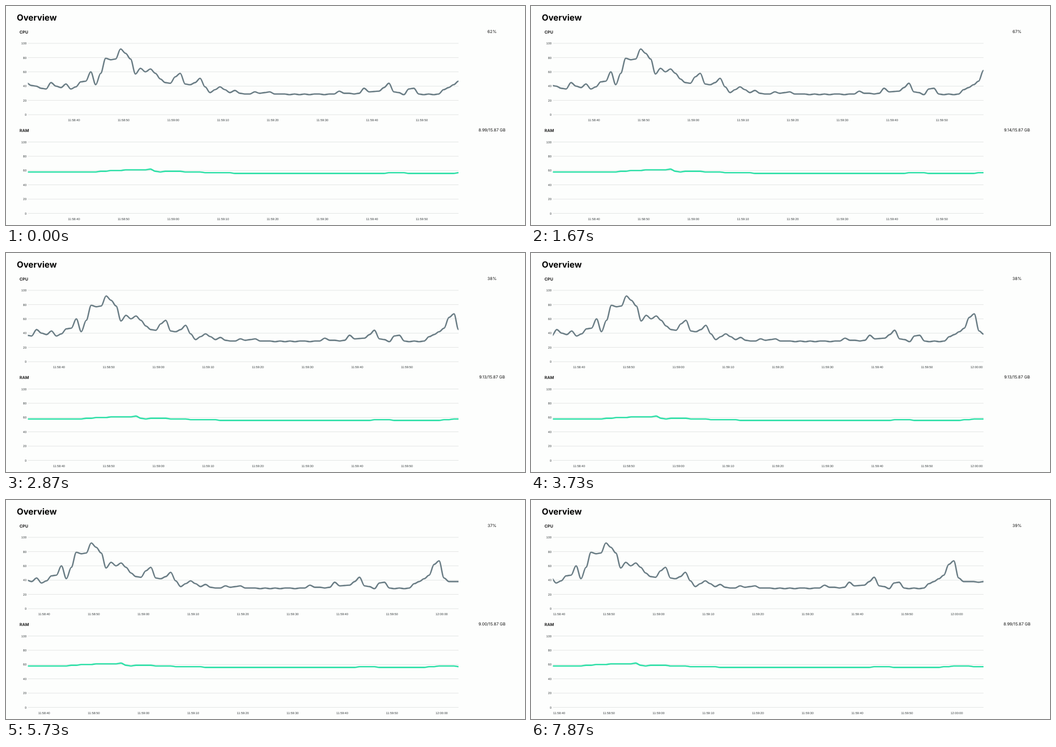
Animation, 960 px wide and 405 px high, one loop 8000 ms. Source, as an HTML page:

```html
<!DOCTYPE html>
<html lang="en">
<head>
<meta charset="utf-8">
<title>Overview</title>
<style>
  html, body { margin: 0; width: 100%; height: 100%; overflow: hidden; background: #fdfefd; }
  svg { display: block; width: 100vw; height: 100vh; text-rendering: geometricPrecision; }
  text { font-family: Inter, sans-serif; fill: #111; }
  .heading { font-size: 15.8px; font-weight: 700; fill: #000; }
  .title { font-size: 7.5px; font-weight: 700; fill: #222; }
  .value { font-size: 7.6px; text-anchor: middle; }
  .axis { font: 5.8px "Liberation Sans", Arial, sans-serif; fill: #373d3f; }
  .level { text-anchor: end; }
  .time { text-anchor: middle; }
  .grid { stroke: #e3e5e4; stroke-width: 1; }
  .line { fill: none; stroke-width: 2.6; }
</style>
</head>
<body>
<svg viewBox="0 0 960 405">
  <clipPath id="plot"><rect x="40.5" y="55" width="796.7" height="335"/></clipPath>
  <text class="heading" x="20" y="27">Overview</text>
</svg>
<script>
const LOOP = 8000, LEFT = 41, RIGHT = 837, STEP = 9.192, UNIT = 1.32;
const EASE_TIME = 400, FIRST_LAST = 87;
const updates = [580, 1700, 2690, 3570, 4552, 5550, 6622, 7600];

const cpu = [
  45, 41, 40, 37, 36, 45, 40, 38, 43, 36, 39, 46, 47, 60, 42, 58, 79, 77, 78, 92,
  86, 78, 57, 65, 60, 64, 58, 50, 45, 44, 53, 58, 43, 42, 45, 51, 39, 31, 35, 39,
  35, 31, 34, 30, 29, 29, 32, 30, 31, 32, 29, 29, 29, 28, 29, 28, 29, 28, 29, 29,
  28, 29, 29, 33, 30, 30, 29, 30, 37, 32, 32.5, 33, 38, 44, 32, 31, 28, 36, 37, 29,
  28, 29, 28, 29, 35, 38, 42, 47, 62, 67, 43, 38, 38, 38, 37, 38, 39
];
// RAM holds its level for long stretches: value x count
const ram = "58x15 59x2 60x3 61x5 62x1 59x1 58x1 59x4 58x4 57x6 56x31 57x4 56x10 57x2 58x4 57x3"
  .split(" ").flatMap(run => {
    const [value, count] = run.split("x").map(Number);
    return Array(count).fill(value);
  });
const ramUsed = ["8.99", "9.14", "9.13", "9.13", "9.13", "9.00", "9.00", "9.00", "8.99"];

const svg = document.querySelector("svg");

function add(tag, attrs, content = "") {
  const node = document.createElementNS("http://www.w3.org/2000/svg", tag);
  for (const key in attrs) node.setAttribute(key, attrs[key]);
  node.textContent = content;
  return svg.appendChild(node);
}

function makeChart(name, data, base, color) {
  add("text", { class: "title", x: 25, y: base - 150.3 }, name);
  for (let level = 0; level <= 100; level += 20) {
    const y = base - level * UNIT;
    add("line", { class: "grid", x1: LEFT, x2: RIGHT, y1: y, y2: y });
    add("text", { class: "axis level", x: 38, y: y + 2.1 }, level);
  }
  const times = Array.from({ length: 9 }, (_, i) => {
    const clock = i < 8 ? `${i < 2 ? "11:58" : "11:59"}:${(40 + i * 10) % 60 || "00"}` : "12:00:00";
    return add("text", { class: "axis time", y: base + 12 }, clock);
  });
  return {
    data, base, times,
    line: add("path", { class: "line", stroke: color, "clip-path": "url(#plot)" }),
    value: add("text", { class: "value", x: 899, y: base - 151.3 })
  };
}

const cpuChart = makeChart("CPU", cpu, 201, "#6a7d85");
const ramChart = makeChart("RAM", ram, 383.5, "#2fe0a8");

// Every point has a level tangent
function linePath(data, base, last, progress) {
  const y = v => base - v * UNIT;
  let px = RIGHT - (last - 1 + progress) * STEP, py = y(data[0]);
  let d = `M${px} ${py}`;
  for (let i = 1; i <= last; i++) {
    const newest = i === last;
    const x = newest ? RIGHT : RIGHT - (last - i - 1 + progress) * STEP;
    const value = newest ? data[i - 1] + (data[i] - data[i - 1]) * progress : data[i];
    const bend = (x - px) * 0.35;
    d += `C${px + bend} ${py} ${x - bend} ${y(value)} ${x} ${y(value)}`;
    px = x;
    py = y(value);
  }
  return d;
}

function drawChart({ data, base, times, line, value }, tick, progress, label) {
  line.setAttribute("d", linePath(data, base, FIRST_LAST + tick, progress));
  value.textContent = label;
  times.forEach((node, i) => {
    const x = 125.6 + i * 10 * STEP - tick * STEP;
    node.setAttribute("x", x);
    node.setAttribute("visibility", x < 826 ? "visible" : "hidden");
  });
}

function draw(now) {
  const t = now % LOOP;
  const tick = updates.filter(start => start <= t).length;
  const elapsed = tick ? Math.min(1, (t - updates[tick - 1]) / EASE_TIME) : 1;
  const progress = 1 - (1 - elapsed) ** 4;
  drawChart(cpuChart, tick, progress, `${cpu[FIRST_LAST + tick + 1]}%`);
  drawChart(ramChart, tick, progress, `${ramUsed[tick]}/15.87 GB`);
}

const begin = performance.now();
function frame() {
  draw(performance.now() - begin);
  requestAnimationFrame(frame);
}
frame();
</script>
</body>
</html>
```
